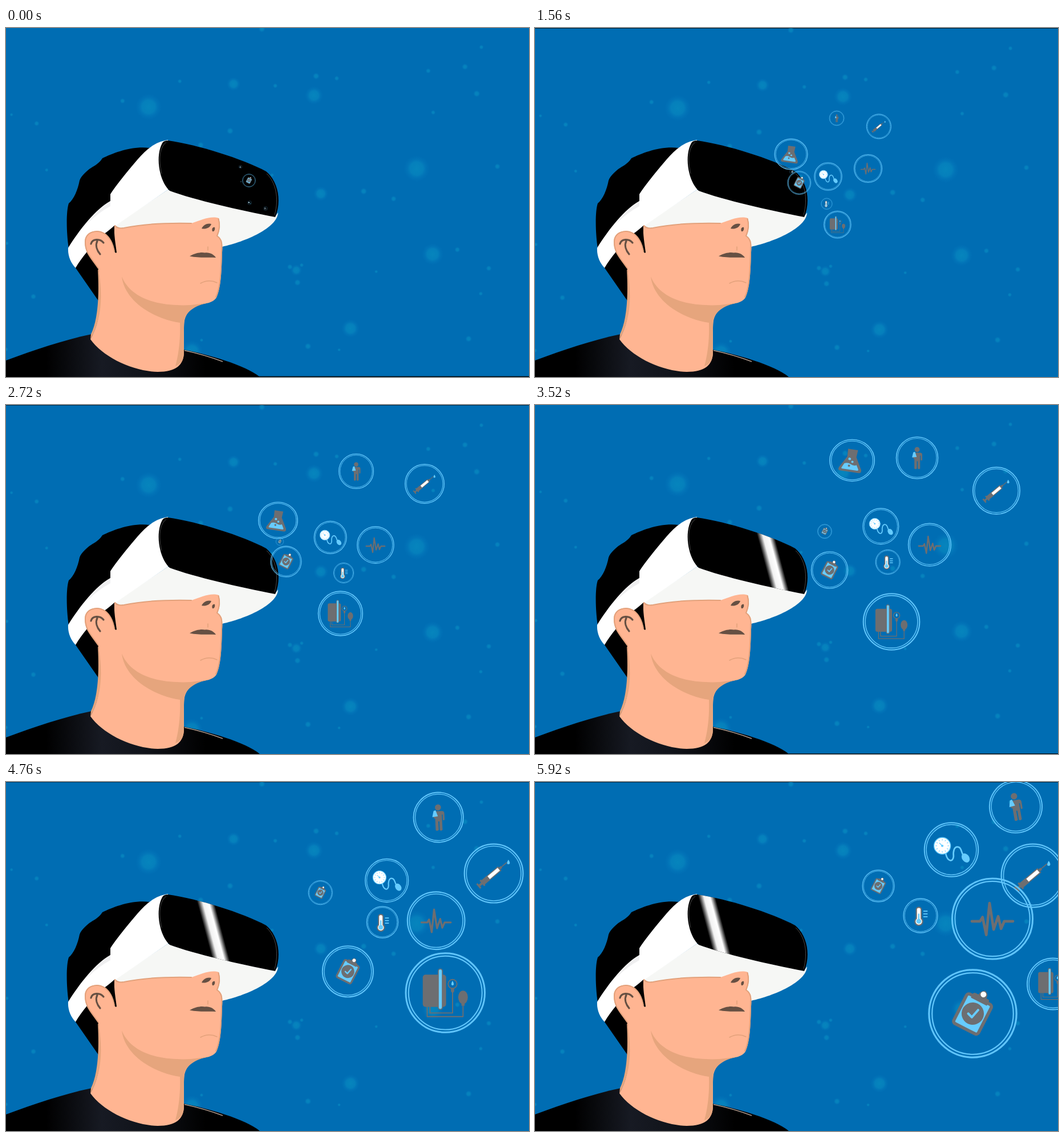
An HTML page for the animation above (5960 ms loop, 917 px wide and 611 px high).

```html
<!DOCTYPE html>
<html lang="en">
<head>
<meta charset="utf-8">
<title>Virtual health</title>
<style>
  html, body { margin: 0; width: 100%; height: 100%; overflow: hidden; background: #000; }
  svg { display: block; width: 100%; height: 100%; }
  .skin { fill: #ffb592; }
  .shade { fill: #e6a57d; }
  .edge { fill: none; stroke: #e2a17b; stroke-width: 2; stroke-linecap: round; }
  .brown { fill: #665043; }
  .ring { fill: none; stroke: #5fc4fa; }
  .g { fill: #6d6e71; }
  .b { fill: #66ccff; }
  .w { fill: #fff; }
  .gl, .bl { fill: none; stroke-linejoin: round; stroke-linecap: round; }
  .gl { stroke: #6d6e71; }
  .bl { stroke: #66ccff; }
</style>
</head>
<body>
<svg viewBox="0 0 917 611" preserveAspectRatio="none">
  <defs>
    <radialGradient id="glow">
      <stop offset="0" stop-color="#0a96c4" stop-opacity=".58"/>
      <stop offset=".5" stop-color="#0a92c4" stop-opacity=".5"/>
      <stop offset=".72" stop-color="#0888c4" stop-opacity=".24"/>
      <stop offset="1" stop-color="#0680c4" stop-opacity="0"/>
    </radialGradient>
    <linearGradient id="cloth" gradientUnits="userSpaceOnUse" x1="70" x2="350">
      <stop offset="0" stop-color="#000"/>
      <stop offset=".35" stop-color="#171a23"/>
      <stop offset=".6" stop-color="#11141b"/>
      <stop offset="1" stop-color="#000"/>
    </linearGradient>
    <linearGradient id="shine">
      <stop offset="0" stop-color="#fff" stop-opacity="0"/>
      <stop offset=".33" stop-color="#fff" stop-opacity=".95"/>
      <stop offset=".68" stop-color="#fff"/>
      <stop offset="1" stop-color="#fff" stop-opacity="0"/>
    </linearGradient>
    <path id="visor" d="M284 197C335 204 415 229 456 251C477 268 484 303 472 331C410 319 330 301 287 285C268 268 261 222 275 200Q278 197 284 197Z"/>
    <clipPath id="visorClip"><use href="#visor"/></clipPath>
  </defs>

  <g id="sky">
    <rect x="-20" width="960" height="611" fill="#006db3"/>
    <g id="lights" transform="translate(0 1.3)"></g>
  </g>

  <!-- hair -->
  <path d="M252 210C220 206 188 219 169 228C163 238 153 242 146 247C138 254 131 260 129 267C126 283 119 300 110 307C105 322 106 360 110 386L122 420L163 479L200 400L200 330Z"/>
  <!-- shirt -->
  <path fill="url(#cloth)" d="M0 582C52 563 98 547 150 536L311 563C352 571 420 590 445 611H0Z"/>
  <path fill="none" stroke="#a8958a" stroke-width="1.5" d="M313 564.5Q348 572 380 584"/>

  <!-- headset -->
  <path fill="#f6f7f5" d="M284 283L190 346L205 356L330 350L379 383C420 374 476 350 477 323L472 330Z"/>
  <path class="w" d="M284 196C262 199 246 212 230 231C212 252 194 274 183 291V303C158 316 128 354 109 385C108 399 114 412 122 420C132 403 150 380 174 359L192 346L284 283L290 240Z"/>
  <path fill="#efeff0" d="M183 303C165 315 150 331 143 342Q162 323 183 312Z"/>
  <use href="#visor"/>
  <path fill="none" stroke="#fff" stroke-width=".7" opacity=".4" d="M281 200C269 209 267 230 273 255M457 255C473 270 479 298 471 327"/>
  <g clip-path="url(#visorClip)">
    <g id="glint"><rect x="-15" y="-110" width="30" height="220" fill="url(#shine)" transform="skewX(15)"/></g>
  </g>

  <!-- face and neck -->
  <path class="skin" d="M190 346Q196 352 207 350C240 343 280 341 325 342C342 336 360 328 373 333C377 345 374 357 371 364C380 370 380 378 379 393C378 425 377 455 369 472C361 484 345 481 333 487C318 495 312 507 312 522V567C312 590 298 602 266 602C222 601 170 576 148 545C160 523 170 498 162 422L165 385L188 385Z"/>
  <path class="edge" d="M191 346Q196 352 207 350C240 343 280 341 325 342"/>
  <path class="edge" d="M372.500 334C376 345 373 357 370 364C379 370 379 378 378 393C377 425 376 455 368 471"/>
  <path class="shade" d="M203 435C215 466 252 484 300 485C320 487 345 482 358 481C340 483 318 492 313 510Q311 530 312 567C312 580 308 588 297 592C303 570 306 545 305 516C262 510 208 480 203 435Z"/>
  <path class="shade" d="M162 422C170 470 168 510 148 545L149 536C160 513 164 475 161 424Z"/>
  <path class="edge" style="stroke-width:1.5" d="M341 447Q356 439 370 446M354 383L354 389"/>
  <path class="brown" d="M322 399.500C332 393.500 343 392 349 393.500C357 392.500 365 397 368 402C354 401 338 403 322 399.500Z"/>
  <path class="brown" d="M343 351C346 344 354 341 360 343C358 350 349 353 343 351ZM362 356C360 351 363 348 366 349C367 353 365 357 362 356Z"/>
  <path d="M175 359L190 346C189 362 192 376 194 393Q192 395 190 391C187 377 182 367 175 359Z"/>
  <!-- ear -->
  <path class="skin" d="M165 425C152 404 138 396 138 375C138 355 160 351 174 360C184 368 188 380 190 391L182 420Z"/>
  <path class="edge" d="M162 421C150 403 139 394 139 375C139 356 160 352 173 360C183 367 188 380 190 391"/>
  <path fill="none" stroke="#665043" stroke-width="3.2" stroke-linecap="round" d="M149 378C151 369 165 368 171 376M160 373C156 381 160 390 165 396"/>

  <g id="icons"></g>
</svg>

<script>
const LOOP = 5960, STEP = 40;
const byId = id => document.getElementById(id);
const clamp01 = v => Math.min(1, Math.max(0, v));

function addGroup(parent, markup) {
  const g = document.createElementNS('http://www.w3.org/2000/svg', 'g');
  g.innerHTML = markup;
  parent.appendChild(g);
  return g;
}

// Soft lights: the large ones are placed, the small ones scattered
let seed = 7;
const random = () => (seed = seed * 16807 % 2147483647) / 2147483647;
const light = (x, y, r) => `<circle cx="${x}" cy="${y}" r="${r}" fill="url(#glow)"/>`;
let lights = light(250, 138, 23) + light(720, 246, 23) + light(748, 396, 19) + light(540, 118, 16)
  + light(604, 526, 16) + light(326, 566, 19) + light(552, 290, 13) + light(399, 98, 12) + light(509, 424, 10);
for (let i = 0; i < 45; i++)
  lights += light(random() * 917, random() * 611, 3 + 3.5 * random());
addGroup(byId('lights'), lights);

// Icons are drawn inside a circle of radius 50
const RINGS = '<circle class="ring" r="49" stroke-width="2.1"/><circle class="ring" r="45.6" stroke-width="1.5"/>';
const icons = [];
// Each pose is [time, x, y, radius]; the icon glides straight from pose to pose
function addIcon(art, poses, { squash = 1, tilt = 0 } = {}) {
  icons.push({ el: addGroup(byId('icons'), RINGS + art), poses, squash, tilt });
}

function poseAt(poses, t) {
  const next = poses.findIndex(p => p[0] > t);
  if (next < 0) return poses[poses.length - 1];
  if (next === 0) return null;
  const a = poses[next - 1], b = poses[next], u = (t - a[0]) / (b[0] - a[0]);
  return a.map((v, i) => v + (b[i] - v) * u);
}

const clipboard = `<g transform="rotate(27)">
  <rect class="b" x="-15.5" y="-18" width="31" height="37" rx="3"/>
  <rect class="gl" x="-15.5" y="-18" width="31" height="37" rx="3" stroke-width="3.6"/>
  <path class="g" d="M-10-15V-20Q-10-22-7-22H-4Q-3-28 1-29Q6-28 6-22H8Q10-22 10-20V-15Z"/>
  <circle class="w" cx="1" cy="-24.5" r="3.2"/><circle class="g" r="12.5"/></g>
  <path class="bl" stroke-width="2.6" d="M-5 0L-1 4L6-4"/>`;

const flask = `<g transform="translate(-2 1) rotate(9)">
  <path class="g" d="M-11-27H11L10-10L25 18Q27 26 20 26H-20Q-27 26-24 18L-10-9Z"/>
  <path class="b" d="M-14 8Q-7 4 0 8T13 8L18 17Q20 21 16 21H-16Q-20 21-18 17Z"/>
  <circle class="b" cx="-4" cy="-4" r="3"/><circle class="b" cx="3" cy="2" r="2.6"/>
  <circle class="g" cx="-3" cy="12" r="2.5"/></g>`;

const person = `<circle class="g" cy="-19.5" r="6"/>
  <path class="g" d="M-7-12H7Q12-12 12-7V5Q10 8 8.5 5V-5H7V25Q4 28 1.5 25V8H-.5V25Q-4 28-6.5 25V2H-8L-11-3L-9-10Q-8-12-7-12Z"/>
  <path class="b" d="M-9-13L-5-14L-1-2L-12-1Z"/>`;

const syringe = `<g transform="rotate(-40)">
  <path class="g" d="M-34-5H-31V-2H-26V-6H-23V-4.5H13V-2H17V2H13V4.5H-23V6H-26V2H-31V5H-34Z"/>
  <rect class="w" x="-11" y="-3" width="22" height="6"/>
  <path class="gl" stroke-width="1.5" d="M17 0H28"/></g>
  <path class="b" d="M24.500-23Q28-18 26.500-16Q24.500-14.500 22.500-16Q21.500-18 24.500-23Z"/>`;

const pulse = `<path class="gl" stroke-width="3.3" d="M-25 3H-15L-12-2L-7.5 19.5L-3.500-19L1.500 13L7-3L10.500 12L14.500 3H25"/>`;

let ticks = '';
for (let a = 0; a < 360; a += 30)
  ticks += `<path class="bl" stroke-width="1" d="M0-12V-10" transform="rotate(${a})"/>`;
const gauge = `<g transform="translate(-16.5 -7)"><circle class="w" r="15"/>
  <circle class="bl" r="15" stroke-width="1.5"/>${ticks}
  <circle class="b" r="2.2"/><path class="bl" stroke-width="1.3" d="M0 0L-5-5"/></g>
  <path class="bl" stroke-width="2.8" d="M-10 8C-7 21 3 24 4 12C3 3 5-5 11-5C18-5 18 4 21 9"/>
  <ellipse class="b" rx="6.5" ry="9" transform="translate(26 15) rotate(-35)"/>`;

const thermometer = `<path class="w" d="M-12-17A7 7 0 0 1 2-17V8A11 11 0 1 1-12 8Z"/>
  <path class="gl" stroke-width="3.5" d="M-12-17A7 7 0 0 1 2-17V8A11 11 0 1 1-12 8Z"/>
  <circle class="b" cx="-5" cy="16" r="7"/><path class="bl" stroke-width="4" d="M-5-4V14"/>
  <path class="bl" stroke-width="3" d="M9-13H19M9-5H19M9 3H19"/>`;

const monitor = `<rect class="g" x="-28" y="-22.5" width="29" height="40" rx="3.5"/>
  <path class="gl" stroke-width="1.3" d="M9-4V25H-19V17M22 13V29.500H-22.500V17"/>
  <rect class="b" x="-8.7" y="-29.5" width="5" height="50" rx="2.5"/>
  <rect class="gl" x="-8.7" y="-29.5" width="5" height="50" rx="2.5" stroke-width="1.2"/>
  <circle class="gl" cx="9" cy="-11" r="5.5" stroke-width="1.3"/>
  <path class="b" d="M9-15Q12-10 9-9Q6-10 9-15Z"/><path class="g" d="M7-6H11V-2L9 1L7-2Z"/>
  <ellipse class="g" cx="22" cy="5.5" rx="6" ry="8.3"/><path class="g" d="M20 12H24V16H20Z"/>`;

addIcon(flask, [[0, 411, 243, 3], [1560, 449, 221, 29.5], [2720, 477, 202, 35], [3520, 556, 97, 40], [4320, 655, -62, 42]], { squash: .93 });
addIcon(person, [[700, 466, 189, 0], [2720, 614, 116, 31], [4320, 726, 69, 43.6], [5920, 843, 43, 47]], { tilt: -10 });
addIcon(syringe, [[120, 440, 215, 6], [2720, 734, 138, 35], [3520, 809, 150, 42], [5240, 873, 164, 56.5]]);
addIcon(pulse, [[200, 478, 250, 1], [1560, 584, 246, 25], [4320, 736, 244, 43.5], [5920, 802, 239.5, 72]]);
addIcon(gauge, [[0, 427, 306, 3.5], [1560, 514, 260, 24.7], [4320, 644, 193, 35], [5920, 730, 118.5, 48.2]]);
addIcon(thermometer, [[100, 410, 325, 0], [2720, 592, 294, 18], [5240, 676, 234, 30.6]]);
addIcon(monitor, [[0, 455, 316, 3.5], [3520, 625, 379.5, 50.3], [4320, 718, 375, 80], [5920, 908, 353.5, 46]]);
addIcon(clipboard, [[0, 412, 269, 1.2], [2720, 480, 239, 7], [5240, 568, 183, 25], [5920, 602, 182, 28.5]]);
addIcon(clipboard, [[0, 426, 267, 11.7], [2720, 491, 274, 27.5], [4320, 542, 304, 38], [5240, 662, 362, 53.7], [5920, 767.5, 405.5, 78.2]]);

function draw(now) {
  const t = Math.floor(now % LOOP / STEP) * STEP;

  const bob = .3 - 1.6 * Math.cos(2 * Math.PI * t / 576);
  byId('sky').setAttribute('transform', `translate(0 ${bob})`);

  byId('glint').setAttribute('transform', `translate(${413 - .04 * (t - 3520)} 260)`);
  byId('glint').setAttribute('opacity', clamp01((t - 2800) / 500));

  for (const { el, poses, squash, tilt } of icons) {
    const pose = poseAt(poses, t);
    el.style.display = pose ? '' : 'none';
    if (!pose) continue;
    const [, x, y, r] = pose, s = r / 50;
    const turn = tilt * clamp01((t - 4320) / 1600);
    el.setAttribute('transform', `translate(${x} ${y}) scale(${s} ${s * squash}) rotate(${turn})`);
  }
}

const begin = performance.now();
function tick() {
  draw(performance.now() - begin);
  requestAnimationFrame(tick);
}
tick();
</script>
</body>
</html>
```
